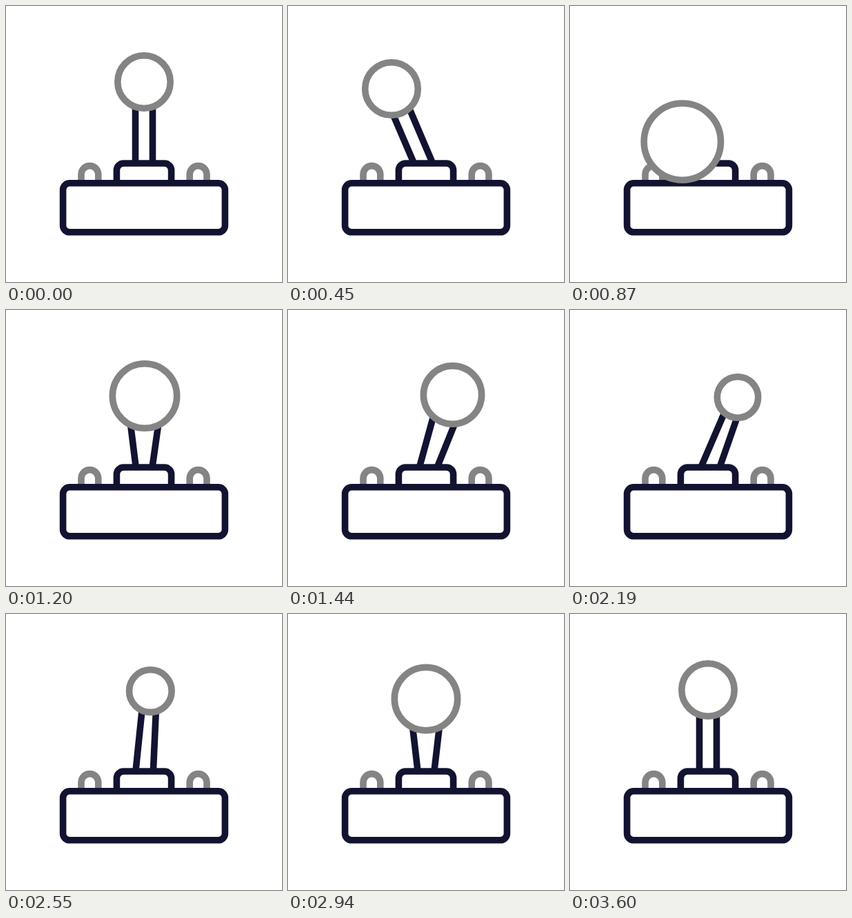
Animation, 400 px wide and 400 px high, one loop 3.63 s. Source, as an HTML page:

```html
<!DOCTYPE html>
<html lang="en">
<head>
<meta charset="utf-8">
<title>Joystick</title>
<style>
  html, body { margin: 0; width: 100%; height: 100%; overflow: hidden; background: #fff; }
  svg { display: block; width: 100vw; height: 100vh; }
  .ink { stroke: #121331; }
  .grey { stroke: #848484; }
  .ink, .grey { fill: none; stroke-width: 9.6; stroke-linejoin: round; }
  .solid { fill: #fff; }
</style>
</head>
<body>
<svg viewBox="0 0 400 400">
  <path id="stick" class="ink"/>
  <path class="grey" d="M109 253V244a12.4 12.4 0 0 1 24.8 0V253M266.2 253V244a12.4 12.4 0 0 1 24.8 0V253"/>
  <path class="ink solid" stroke-linecap="round" d="M160.4 257V238a10 10 0 0 1 10-10H229.6a10 10 0 0 1 10 10V257"/>
  <rect class="ink solid" x="82.6" y="256.8" width="234.8" height="71" rx="9.6"/>
  <circle id="ball" class="grey solid"/>
</svg>
<script>
  const LOOP = 3630, STEP = 30;
  const PIVOT = { x: 200, y: 237 };
  const REST_R = 43, STICK_HALF = 12.5, STROKE = 9.6;

  // time, ball centre x, y, outer radius
  const keys = [
    [0, 200, 110, 43],
    [255, 174, 112.7, 43],
    [450, 150, 120, 43.1],
    [570, 146.7, 121.5, 43.5],
    [690, 153, 121.6, 48],
    [900, 165, 201, 61],
    [1080, 186, 176, 58],
    [1200, 201, 124.5, 51.5],
    [1380, 232, 123, 48],
    [1620, 252.5, 123.4, 44.4],
    [1690, 255, 123.4, 44.1],
    [1740, 254.5, 123.5, 43.9],
    [2190, 243, 126.5, 34.5],
    [2400, 225, 119, 33.5],
    [2700, 200, 107, 40],
    [2760, 200, 110, 43],
    [2940, 200, 123, 50.5],
    [3060, 200, 124, 51],
    [3240, 200, 120.5, 49],
    [3600, 200, 110, 43]
  ];

  const ball = document.getElementById('ball');
  const stick = document.getElementById('stick');

  const slope = (i, c) => (keys[i + 1][c] - keys[i][c]) / (keys[i + 1][0] - keys[i][0]);

  // Monotone tangent: flat at extremes, harmonic mean elsewhere
  function tangent(i, c) {
    if (i === 0 || i === keys.length - 1) return 0;
    const a = slope(i - 1, c), b = slope(i, c);
    return a * b <= 0 ? 0 : 2 * a * b / (a + b);
  }

  function sample(t, c) {
    const last = keys.length - 1;
    if (t >= keys[last][0]) return keys[last][c];
    let i = 0;
    while (t >= keys[i + 1][0]) i++;
    const p = keys[i], q = keys[i + 1], d = q[0] - p[0];
    const u = (t - p[0]) / d, v = 1 - u;
    return p[c] * (1 + 2 * u) * v * v + q[c] * (3 - 2 * u) * u * u
      + d * u * v * (tangent(i, c) * v - tangent(i + 1, c) * u);
  }

  function draw(t) {
    const [x, y, r] = [1, 2, 3].map(c => sample(t, c));
    ball.setAttribute('cx', x);
    ball.setAttribute('cy', y);
    ball.setAttribute('r', r - STROKE / 2);

    // The rods spread as the ball nears the viewer
    const dx = x - PIVOT.x, dy = y - PIVOT.y, len = Math.hypot(dx, dy);
    const nx = -dy / len, ny = dx / len;
    const spread = (r - REST_R) * (r > REST_R ? 1.55 : 0.43);
    const top = STICK_HALF + spread, foot = STICK_HALF - 0.14 * spread;
    const rod = s => `M${PIVOT.x + s * foot * nx} ${PIVOT.y + s * foot * ny}L${x + s * top * nx} ${y + s * top * ny}`;
    stick.setAttribute('d', rod(-1) + rod(1));
  }

  const start = performance.now();
  function tick() {
    const t = (performance.now() - start) % LOOP;
    draw(Math.floor(t / STEP) * STEP);
    requestAnimationFrame(tick);
  }
  tick();
</script>
</body>
</html>
```
